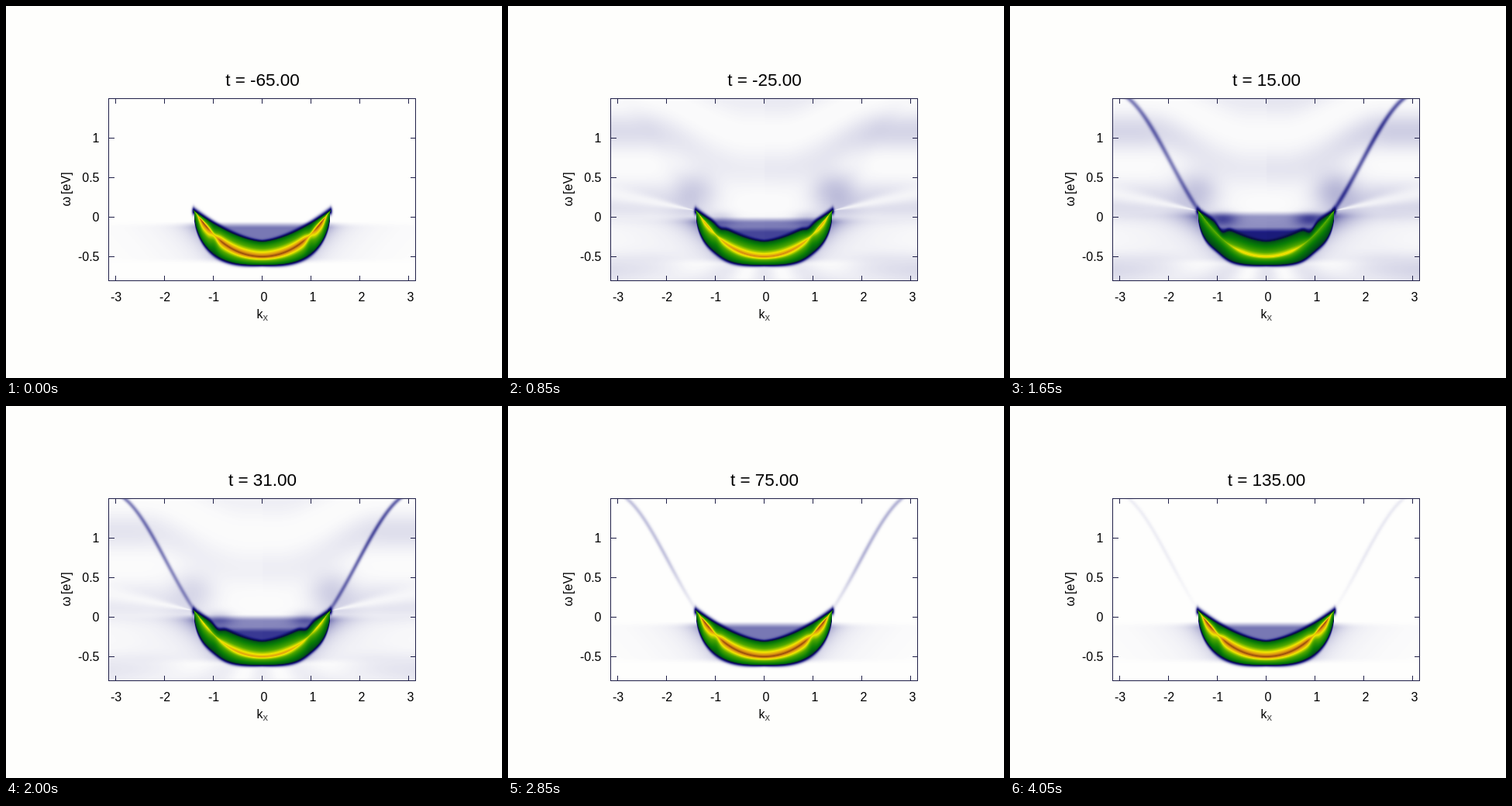
An HTML page with a canvas for the animation above (4.1 s loop, 640x480 px).

```html
<!DOCTYPE html>
<html lang="en">
<head>
<meta charset="utf-8">
<title>Spectral function over time</title>
<style>
html, body { margin: 0; width: 100%; height: 100%; overflow: hidden; background: #fefefc; }
canvas { position: absolute; left: 133px; top: 120px; }
svg { position: absolute; left: 0; top: 0; font: 16px "Liberation Sans", Arial, sans-serif; }
</style>
</head>
<body>
<canvas id="map" width="396" height="235"></canvas>
<svg width="640" height="480" viewBox="0 0 640 480">
  <g id="ticks" text-anchor="end"></g>
  <rect x="132.5" y="119.5" width="396" height="235" fill="none" stroke="#202048"/>
  <text id="title" x="331" y="103" font-size="22.5" text-anchor="middle"></text>
  <text transform="translate(83 236.5) rotate(-90)" text-anchor="middle">ω&#8201;[eV]</text>
  <text x="323.5" y="403">k<tspan dy="3" font-size="13" fill="#444">x</tspan></text>
</svg>
<script>
const LOOP = 4100, STEP = 40, LAST = 100;
const LEFT = 133, TOP = 120, W = 396, H = 235;
const MID = 330.5, ZERO = 272.5, PX_K = 63, PX_E = 102;
const TIP = 88, TIP_Y = 264;   // where the occupied band ends
const EDGE = .38;              // value on the outline of the occupied band

const clamp = (v, a = 0, b = 1) => Math.min(b, Math.max(a, v));
const mix = (a, b, u) => a + (b - a) * u;
const smooth = (a, b, v) => { const u = clamp((v - a) / (b - a)); return u * u * (3 - 2 * u); };
const bump = (v, c, s) => Math.exp(-(((v - c) / s) ** 2));
const plateau = (v, c, s) => Math.exp(-(((v - c) / s) ** 4));
const sigmoid = v => 1 / (1 + Math.exp(-v));
const wave = phase => .5 + .5 * Math.cos(phase);

// Colour scale from empty to fully occupied
const SCALE = [
  [0, "fefefd"], [.3, "1e1e84"], [.37, "080e48"], [.42, "004a18"], [.5, "087c06"],
  [.62, "50a800"], [.74, "f0e600"], [.86, "e09a10"], [1, "96480c"]
].map(([at, hex]) => [at, hex.match(/../g).map(h => parseInt(h, 16))]);

function colorAt(v) {
  const i = Math.max(1, SCALE.findIndex(([at]) => at >= v));
  const [a, from] = SCALE[i - 1], [b, to] = SCALE[i];
  const [r, g, bl] = from.map((c, n) => Math.round(mix(c, to[n], (v - a) / (b - a))));
  return (255 << 24 | bl << 16 | g << 8 | r) >>> 0;
}
const LUT = Array.from({ length: 1001 }, (_, i) => colorAt(i / 1000));

// Band energy, and the outline of its occupied part, by distance from the centre line
const bandY = k => ZERO - PX_E * (.405 - 1.042 * Math.cos(k) + .1366 * Math.cos(2 * k));
const upperEdge = dx => 304 - 40 * Math.min(1, dx / TIP) ** 1.6;
const lowerEdge = dx => TIP_Y + 1 + 69 * Math.max(0, 1 - (dx / TIP) ** 3) ** .53;

const columns = Array.from({ length: W }, (_, i) => {
  const x = LEFT + i + .5, dx = Math.abs(x - MID), k = dx / PX_K;
  const slope = (1.042 * Math.sin(k) - .273 * Math.sin(2 * k)) * PX_E / PX_K;
  return { dx, center: bandY(k), flat: 1 / Math.hypot(1, slope), side: x > MID ? 1 : .8 };
});

// Pumped background: bowed ripples, a glow above each tip, a pale streak and a fan below
function ripples({ dx, side }, y) {
  const crest = 210 - 48 * smooth(20, 150, dx);
  const strength = mix(.028, .06, smooth(60, 170, dx)) * (1 - .5 * smooth(270, 310, y));
  const streak = bump(Math.atan2(TIP_Y - y, dx - TIP), .2, .12);
  const fan = smooth(310, 345, y) * wave(9 * Math.atan2(dx, y - 280));
  const glow = bump(dx, 90, 30) * bump(y, 240, 27);
  return .006 + (strength * wave((y - crest) * 2 * Math.PI / 90) ** 1.4 + .09 * glow) * side * (1 - .8 * streak)
    + .03 * fan;
}
const background = new Float32Array(W * H);
columns.forEach((col, i) => {
  for (let j = 0; j < H; j++) background[j * W + i] = ripples(col, TOP + j + .5);
});

const ctx = document.getElementById("map").getContext("2d");
const image = ctx.createImageData(W, H);
const pixels = new Uint32Array(image.data.buffer);

function drawMap(t) {
  const pump = plateau(t, 0, 38);
  const depleted = plateau(t, 5, 32);
  const branch = .21 * sigmoid((t + 2) / 6) / (1 + (Math.max(0, t) / 70) ** 3);
  const spread = 2.7 + 11 * sigmoid(-(t + 4) / 6);
  const fade = .7 * clamp(t / 70);
  const hazeTop = 282 - 14 * depleted;

  columns.forEach(({ dx, center, flat, side }, i) => {
    const top = upperEdge(dx) + 8 * depleted * bump(dx, 57, 7);
    const bottom = lowerEdge(dx) - 4 * depleted * bump(dx, 65, 14);
    const core = clamp(center, top + .4, bottom - .4);
    const calm = 1 - .2 * bump(dx, 62, 6) - .42 * smooth(76, 89, dx);
    const excited = .77 - .14 * smooth(28, 60, dx);
    const peak = mix(calm, excited, depleted);
    const tipGap = Math.max(0, dx - TIP);

    for (let j = 0; j < H; j++) {
      const y = TOP + j + .5, n = j * W + i;
      let v;
      if (!tipGap && y > top && y < bottom) {
        const inner = 1 - Math.abs(y - core) / (y < core ? core - top : bottom - core);
        v = EDGE + (peak - EDGE) * (inner ** .5 + inner ** 3) / 2;
      } else {
        const gap = Math.max(0, dx - 38 - (333 - y) * .88);
        const band = smooth(hazeTop - 5, hazeTop + 5, y) * (1 - smooth(324, 334, y));
        let haze = band * (mix(.15, .1, depleted) * Math.exp(-gap / 13) + .03 * Math.exp(-gap / 65));
        if (y < top) {
          haze += depleted * (.16 * smooth(284, 293, y) + .1 * bump(dx, 55, 18) * bump(y, 275, 9));
        }
        haze += background[n] * pump;
        if (dx > TIP - 4) {
          haze += branch * side * (1 - fade * smooth(185, 262, y)) * bump((y - center) * flat, 0, spread);
        }
        const out = Math.max(0, top - y, y - bottom) / (1 + dx / 95);
        const rim = bump(Math.hypot(out, tipGap), 0, 2.4);
        v = Math.min(EDGE, mix(haze, EDGE, rim));
      }
      pixels[n] = LUT[Math.round(clamp(v) * 1000)];
    }
  });
  ctx.putImageData(image, 0, 0);
}

function buildTicks() {
  const line = d => `<path d="${d}" stroke="#202048" fill="none"/>`;
  let out = "";
  for (let k = -3; k <= 3; k++) {
    const x = Math.round(MID + k * PX_K - .5) + .5;
    out += line(`M${x} 354v-6M${x} 120v6`);
    out += `<text x="${x + (k < 0 ? .5 : 2.5)}" y="381" text-anchor="middle">${k}</text>`;
  }
  for (let e = -.5; e <= 1; e += .5) {
    const y = ZERO - e * PX_E;
    out += line(`M133 ${y}h7M528 ${y}h-6`);
    out += `<text x="120.5" y="${y + 5.5}">${e}</text>`;
  }
  document.getElementById("ticks").innerHTML = out;
}

const title = document.getElementById("title");
let shown = -1;

function render(ms) {
  const index = clamp(Math.floor((ms % LOOP - 44) / STEP), 0, LAST);
  if (index === shown) return;
  shown = index;
  const t = -65 + 2 * index;
  title.textContent = `t = ${t.toFixed(2)}`;
  drawMap(t);
}

buildTicks();
render(0);
const start = performance.now();
requestAnimationFrame(function loop() {
  render(performance.now() - start);
  requestAnimationFrame(loop);
});
</script>
</body>
</html>
```
